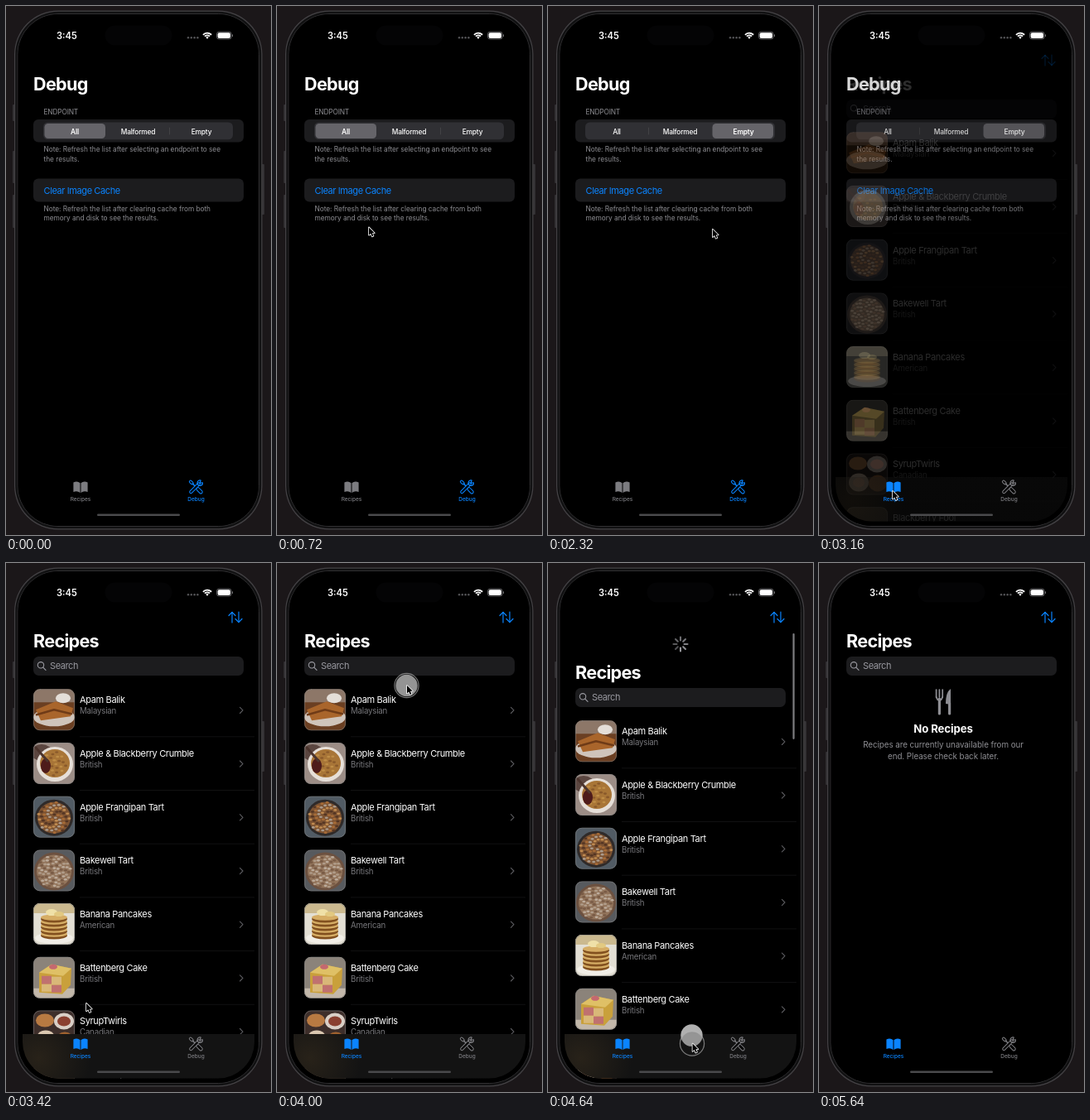
Animation of 320 by 639 pixels, one loop 6290 ms. Source, as an HTML page with a canvas:

```html
<!DOCTYPE html>
<html lang="en">
<head>
<meta charset="utf-8">
<title>Recipes</title>
<style>
  html, body { margin: 0; width: 100%; height: 100%; overflow: hidden; background: #1b1719; }
  canvas { display: block; width: 320px; height: 639px; }
</style>
</head>
<body>
<canvas id="stage"></canvas>
<script>
const LOOP = 6290;
const BLUE = '#0a84ff', GREY = '#8e8e93', CELL = '#1c1c1e';
const canvas = document.getElementById('stage');
const ctx = canvas.getContext('2d');
const dpr = window.devicePixelRatio || 1;
canvas.width = 320 * dpr;
canvas.height = 639 * dpr;

// time, x, y of the pointer tip
const POINTER = [
  [380, 8, 361], [1000, 230, 159], [1180, 241, 147.5], [2060, 241, 147.5],
  [2700, 92, 579], [2860, 89, 586], [3300, 89, 586], [3360, 90, 577],
  [3960, 157, 148], [4100, 157, 148], [4380, 159.5, 306], [4640, 174.5, 580],
  [4900, 175, 598], [5440, 175, 598], [5640, 322, 424]
];
const PULL = [[4100, 0], [4380, 69], [4510, 122], [4640, 38], [4700, 38], [4860, 0]];
const TOUCHES = [[1470, 1660], [2810, 3000], [3940, 4720]];

const ramp = (t, a, b) => Math.min(1, Math.max(0, (t - a) / (b - a)));
const ease = (t, a, b) => { const u = ramp(t, a, b); return u * u * (3 - 2 * u); };

// Monotone cubic through keyed values
function track(keys, t, c = 1) {
  const i = keys.findIndex(k => k[0] > t);
  if (i < 0) return keys[keys.length - 1][c];
  if (i === 0) return keys[0][c];
  const slope = j => {
    const p = keys[j - 1], q = keys[j], r = keys[j + 1];
    if (!p || !r || (q[c] - p[c]) * (r[c] - q[c]) <= 0) return 0;
    return (r[c] - p[c]) / (r[0] - p[0]);
  };
  const a = keys[i - 1], b = keys[i], h = b[0] - a[0], u = (t - a[0]) / h;
  const s = u * u * (3 - 2 * u);
  return a[c] + (b[c] - a[c]) * s
    + h * u * (1 - u) * ((1 - u) * slope(i - 1) - u * slope(i));
}

function text(str, x, mid, size, color, { weight = 400, space = 0, align = 'left' } = {}) {
  ctx.font = `${weight} ${size}px Inter, Roboto, sans-serif`;
  ctx.letterSpacing = space + 'px';
  ctx.textAlign = align;
  ctx.fillStyle = color;
  ctx.fillText(str, x, mid + size * 0.36);
}

function rounded(x, y, w, h, r) {
  ctx.beginPath();
  ctx.roundRect(x, y, w, h, r);
}

function box(x, y, w, h, r, color) {
  rounded(x, y, w, h, r);
  ctx.fillStyle = color;
  ctx.fill();
}

function oval(x, y, rx, ry, color) {
  ctx.beginPath();
  ctx.ellipse(x, y, rx, ry, 0, 0, Math.PI * 2);
  ctx.fillStyle = color;
  ctx.fill();
}

function line(points, color, width, cap = 'round') {
  ctx.beginPath();
  points.forEach(([x, y]) => ctx.lineTo(x, y));
  ctx.strokeStyle = color;
  ctx.lineWidth = width;
  ctx.lineCap = cap;
  ctx.lineJoin = 'round';
  ctx.stroke();
}

function shape(points, color) {
  ctx.beginPath();
  points.forEach(([x, y]) => ctx.lineTo(x, y));
  ctx.closePath();
  ctx.fillStyle = color;
  ctx.fill();
}

function layer(alpha, draw) {
  if (alpha <= 0) return;
  ctx.save();
  ctx.globalAlpha *= alpha;
  draw();
  ctx.restore();
}

function flecks(count, radius, colors) {
  for (let i = 0; i < count; i++) {
    const a = i * 2.4, r = radius * Math.sqrt((i + 0.5) / count);
    oval(25 + r * Math.cos(a), 26 + r * Math.sin(a), 2, 1.3, colors[i % colors.length]);
  }
}

// Each dish is painted on a 50 by 50 tile
const DISHES = [
  ['Apam Balik', 'Malaysian', () => {
    box(0, 0, 50, 50, 0, '#6b3f22');
    box(0, 0, 50, 16, 0, '#8d7768');
    oval(36, 11, 9, 6, '#e4ded8');
    oval(25, 34, 25, 11, '#cfc4bb');
    shape([[3, 25], [27, 15], [48, 23], [45, 33], [9, 38]], '#a9652b');
    line([[4, 31], [25, 25], [46, 30]], '#6f3b17', 2.5);
  }],
  ['Apple & Blackberry Crumble', 'British', () => {
    box(0, 0, 50, 50, 0, '#9c8d86');
    oval(10, 12, 13, 10, '#5b4640');
    oval(26, 26, 22, 21, '#e6dfd8');
    oval(26, 25, 18, 17, '#a87537');
    layer(0.7, () => flecks(24, 15, ['#c9994f', '#7d4d26']));
    oval(15, 28, 6, 9, '#4e1b1a');
    line([[3, 6], [17, 22]], '#4a332c', 3);
  }],
  ['Apple Frangipan Tart', 'British', () => {
    box(0, 0, 50, 50, 0, '#515b64');
    oval(25, 26, 23, 22, '#2f2a29');
    oval(25, 26, 20, 19, '#7d5332');
    flecks(60, 19, ['#aa9a8b', '#a86c37', '#543523', '#c08b50']);
  }],
  ['Bakewell Tart', 'British', () => {
    box(0, 0, 50, 50, 0, '#575a5e');
    oval(25, 26, 24, 23, '#6c5140');
    oval(25, 26, 21, 20, '#92745b');
    flecks(70, 20, ['#b09c89', '#785a45', '#bcab9b']);
  }],
  ['Banana Pancakes', 'American', () => {
    box(0, 0, 50, 50, 0, '#e3dfd4');
    box(0, 0, 50, 12, 0, '#cbb98f');
    oval(25, 42, 23, 7, '#f1eee7');
    for (let y = 39; y > 14; y -= 5) {
      oval(25, y, 16, 4.5, '#82501f');
      oval(25, y - 2, 16, 3.6, '#d6ad65');
    }
    oval(22, 11, 7, 4, '#efe0a8');
    oval(31, 13, 6, 3, '#e2c981');
  }],
  ['Battenberg Cake', 'British', () => {
    box(0, 0, 50, 50, 0, '#8b837a');
    box(0, 38, 50, 12, 0, '#c3b8aa');
    shape([[7, 19], [22, 9], [46, 14], [45, 34], [35, 45], [7, 43]], '#c9a03b');
    shape([[7, 19], [22, 9], [46, 14], [36, 23]], '#dfc066');
    box(10, 23, 12, 10, 0, '#c0716f');
    box(22, 24, 12, 10, 0, '#d9b878');
    box(10, 33, 12, 9, 0, '#d9b878');
    box(22, 34, 12, 9, 0, '#c0716f');
    oval(24, 12, 5, 3, '#c4696f');
  }],
  ['SyrupTwirls', 'Canadian', () => {
    box(0, 0, 50, 50, 0, '#3e2f2b');
    oval(14, 12, 11, 8, '#b87a42');
    oval(37, 13, 12, 10, '#d9cfc6');
    oval(37, 13, 8, 6, '#8a4030');
    oval(15, 35, 12, 11, '#dac7b0');
    oval(38, 36, 11, 10, '#a0622f');
    oval(15, 35, 7, 6, '#6b3a26');
  }],
  ['Blackberry Fool', 'British', () => box(0, 0, 50, 50, 0, '#5b4a3c')]
];

function phone() {
  box(0, 0, 320, 639, 0, '#1b1719');
  [[8, 119, 20], [8, 175, 39], [8, 228, 40], [308.5, 191, 61]]
    .forEach(([x, y, h]) => box(x, y, 3.5, h, 1, '#343235'));
  box(10, 5.5, 299.5, 627, 53, '#444245');
  box(11.2, 6.7, 297.1, 624.6, 52, '#111112');
  rounded(14, 9.5, 291.5, 619, 49);
  ctx.strokeStyle = '#302f31';
  ctx.lineWidth = 1;
  ctx.stroke();
  box(14.5, 10, 290.5, 618, 48.5, '#000');
}

function statusBar() {
  box(119.5, 23.5, 81, 24, 12, '#040405');
  text('3:45', 61, 36, 11.1, '#fff', { weight: 600 });
  for (let i = 0; i < 4; i++) oval(220 + i * 3.8, 38.3, 1.2, 1.2, '#555558');
  [6.9, 4.2].forEach(r => {
    ctx.beginPath();
    ctx.arc(243, 39.5, r, -Math.PI * 0.76, -Math.PI * 0.24);
    ctx.strokeStyle = '#fff';
    ctx.lineWidth = 1.8;
    ctx.lineCap = 'butt';
    ctx.stroke();
  });
  shape([[243, 40], [241.3, 37.6], [243, 36.9], [244.7, 37.6]], '#fff');
  rounded(254.5, 31.2, 17.6, 8.8, 2.8);
  ctx.strokeStyle = '#77777a';
  ctx.lineWidth = 0.8;
  ctx.stroke();
  box(255.6, 32.3, 15.4, 6.6, 1.9, '#fff');
  box(272.9, 34.2, 1, 2.8, 0.5, '#77777a');
}

function title(str, mid) {
  text(str, 33, mid, 21.6, '#fff', { weight: 700, space: -0.7 });
}

function note(lines, mid) {
  lines.forEach((str, i) => text(str, 45.5, mid + i * 11.5, 8.3, GREY, { space: -0.03 }));
}

function debugScreen(t) {
  title('Debug', 94.5);
  text('ENDPOINT', 45.5, 128, 8.4, GREY, { space: -0.2 });
  box(33, 137, 254, 27.5, 6, CELL);
  box(45, 140.5, 229, 20.8, 5.5, '#303034');
  const slide = ease(t, 1640, 1860);
  layer(1 - slide, () => line([[197.5, 147], [197.5, 155]], '#48484b', 0.8));
  layer(slide, () => line([[121.5, 147], [121.5, 155]], '#48484b', 0.8));
  box(46.5 + slide * 152, 142, 73.5, 18, 4.5, '#656469');
  ['All', 'Malformed', 'Empty'].forEach((name, i) => {
    const picked = i === (slide > 0.5 ? 2 : 0);
    text(name, 83 + i * 76.5, 151.5, 8.4, '#fff',
      { weight: picked ? 600 : 500, space: -0.2, align: 'center' });
  });
  note(['Note: Refresh the list after selecting an endpoint to see', 'the results.'], 173.5);
  box(33, 208.5, 254, 28, 6, CELL);
  text('Clear Image Cache', 45.5, 223, 11, BLUE, { space: -0.4 });
  note(['Note: Refresh the list after clearing cache from both',
    'memory and disk to see the results.'], 245);
}

function sortArrows() {
  line([[273, 72], [273, 59.5]], BLUE, 1.2);
  line([[269, 63.5], [273, 59.3], [277, 63.5]], BLUE, 1.2);
  line([[281, 59], [281, 71.5]], BLUE, 1.2);
  line([[277, 67.5], [281, 71.7], [285, 67.5]], BLUE, 1.2);
}

function searchField() {
  box(33, 113, 254, 23, 6.5, CELL);
  ctx.beginPath();
  ctx.arc(42, 123.3, 3.7, 0, Math.PI * 2);
  ctx.strokeStyle = '#98989f';
  ctx.lineWidth = 1.1;
  ctx.stroke();
  line([[44.8, 126.2], [48, 129.4]], '#98989f', 1.2);
  text('Search', 53, 124.5, 11, '#98989f', { space: -0.4 });
}

function recipeRow([name, origin, paint], i) {
  const y = 152.3 + i * 64.7;
  ctx.save();
  ctx.translate(33, y);
  rounded(0, 0, 50, 50, 8);
  ctx.save();
  ctx.clip();
  paint();
  ctx.restore();
  rounded(0.4, 0.4, 49.2, 49.2, 8);
  ctx.strokeStyle = 'rgba(130,130,130,.7)';
  ctx.lineWidth = 0.8;
  ctx.stroke();
  ctx.restore();
  text(name, 89, y + 13, 11, '#fff', { space: -0.35 });
  text(origin, 89, y + 26.5, 9.7, '#77777b', { space: -0.2 });
  line([[282.5, y + 22], [286, y + 25.6], [282.5, y + 29.2]], '#5b5b5f', 1.1);
  line([[89, y + 57.5], [300, y + 57.5]], '#1d1d1f', 0.6, 'butt');
}

function emptyState() {
  [141.6, 145.4, 149.2].forEach(x => line([[x, 153], [x, 162]], GREY, 1.7));
  line([[141.6, 162], [143.5, 165.5], [147.3, 165.5], [149.2, 162]], GREY, 1.7);
  line([[145.4, 164], [145.4, 182]], GREY, 3.2);
  ctx.beginPath();
  ctx.moveTo(159, 152);
  ctx.quadraticCurveTo(153, 156, 153, 170);
  ctx.lineTo(159, 171);
  ctx.closePath();
  ctx.fillStyle = GREY;
  ctx.fill();
  line([[157.6, 169], [157.6, 182]], GREY, 3.2);
  text('No Recipes', 150, 200, 13.2, '#fff', { weight: 700, space: -0.1, align: 'center' });
  const style = { space: -0.05, align: 'center' };
  text('Recipes are currently unavailable from our', 150, 219.5, 9.8, GREY, style);
  text('end. Please check back later.', 150, 233, 9.8, GREY, style);
}

function spinner(t, pull) {
  const spinning = t > 4500;
  const shown = spinning ? 8 : Math.max(0, (pull - 58) / 8);
  const turn = Math.floor(t / 60);
  for (let i = 0; i < 8; i++) {
    const a = i * Math.PI / 4 - Math.PI / 2, c = Math.cos(a), s = Math.sin(a);
    const shade = spinning ? 0.45 + 0.4 * ((i - turn % 8 + 8) % 8) / 7 : 0.4;
    layer(shade * ramp(shown, i, i + 1), () =>
      line([[160 + 4.5 * c, 98 + 4.5 * s], [160 + 8.5 * c, 98 + 8.5 * s]], '#b0b0b5', 2.1));
  }
}

function recipesScreen(t) {
  const pull = track(PULL, t);
  const listed = 1 - ease(t, 4700, 4820);
  sortArrows();
  layer(1 - ramp(t, 4720, 4840), () => spinner(t, pull));
  ctx.save();
  ctx.translate(0, pull);
  title('Recipes', 94.5);
  searchField();
  layer(listed, () => DISHES.forEach(recipeRow));
  layer(ease(t, 4760, 4880), emptyState);
  ctx.restore();
  layer(ramp(t, 4110, 4180) * (1 - ramp(t, 4740, 4880)), () =>
    box(295.5, 85, 2.2, Math.max(20, 61 + (69 - pull) * 2.16), 1.1, '#7d7d80'));
}

function barBackdrop() {
  const glow = ctx.createRadialGradient(40, 598, 0, 40, 598, 62);
  glow.addColorStop(0, '#282219');
  glow.addColorStop(1, '#131313');
  box(20, 569, 280, 54, 0, glow);
}

function bookIcon(color) {
  [-1, 1].forEach(side => {
    ctx.beginPath();
    ctx.moveTo(90 + side * 0.5, 576.3);
    ctx.quadraticCurveTo(90 + side * 4, 573.2, 90 + side * 8.6, 575.6);
    ctx.lineTo(90 + side * 8.6, 587);
    ctx.quadraticCurveTo(90 + side * 4, 585, 90 + side * 0.5, 588);
    ctx.closePath();
    ctx.fillStyle = color;
    ctx.fill();
  });
}

function toolsIcon(color) {
  ctx.save();
  ctx.translate(229.3, 581);
  const outlined = (a, b, width) => {
    line([a, b], color, width);
    line([a, b], '#000', width - 2);
  };
  outlined([-6.4, -6.4], [-4.6, -4.6], 4);
  line([[-4, -4], [1, 1]], color, 1.6);
  outlined([2.6, 2.6], [6, 6], 4.8);
  outlined([-6, 6], [3.4, -3.4], 4.2);
  ctx.beginPath();
  ctx.arc(4.9, -4.9, 3.2, -0.1, Math.PI * 1.6);
  ctx.lineTo(4.6, -4.6);
  ctx.closePath();
  ctx.strokeStyle = color;
  ctx.lineWidth = 1.2;
  ctx.stroke();
  ctx.restore();
}

function tabBar(t) {
  const onRecipes = t >= 3060;
  const left = onRecipes ? BLUE : '#7c7c80', right = onRecipes ? '#7c7c80' : BLUE;
  const style = { weight: 500, align: 'center' };
  bookIcon(left);
  text('Recipes', 90, 595.6, 6.5, left, style);
  toolsIcon(right);
  text('Debug', 229.5, 595.6, 6.5, right, style);
  box(110, 613.6, 100, 2.4, 1.2, '#4a4a4c');
}

function touch(t, x, y) {
  const alpha = Math.max(...TOUCHES.map(([a, b]) => ramp(t, a, a + 50) * (1 - ramp(t, b, b + 80))));
  layer(alpha, () => {
    oval(track(POINTER, t - 16, 1) - 0.5, track(POINTER, t - 16, 2), 13.2, 13.2, 'rgba(195,195,195,.9)');
    oval(x - 0.5, y, 14.6, 14.6, 'rgba(20,20,20,.18)');
    ctx.strokeStyle = 'rgba(180,180,180,.65)';
    ctx.lineWidth = 1.2;
    ctx.stroke();
  });
}

function pointer(t) {
  if (t < 380 || t >= 5640) return;
  const x = track(POINTER, t, 1), y = track(POINTER, t, 2);
  touch(t, x, y);
  const outline = [[0, 0], [0, 9.4], [2.2, 7.4], [3.8, 11], [5.4, 10.3], [3.9, 6.8], [6.8, 6.8], [0, 0]]
    .map(([dx, dy]) => [x + dx, y + dy]);
  line(outline, '#fff', 1.6);
  shape(outline, '#000');
}

function draw(t) {
  ctx.setTransform(dpr, 0, 0, dpr, 0, 0);
  phone();
  ctx.save();
  rounded(20, 15, 280, 607.5, 44);
  ctx.clip();
  const fade = ramp(t, 3120, 3360);
  if (fade < 1) debugScreen(t);
  layer(fade, () => {
    box(20, 50, 280, 573, 0, '#000');
    recipesScreen(t);
  });
  layer(Math.sqrt(fade) * (1 - ease(t, 4700, 4840)), barBackdrop);
  tabBar(t);
  ctx.restore();
  statusBar();
  pointer(t);
}

const start = performance.now();
function tick() {
  draw((performance.now() - start) % LOOP);
  requestAnimationFrame(tick);
}
tick();
</script>
</body>
</html>
```
